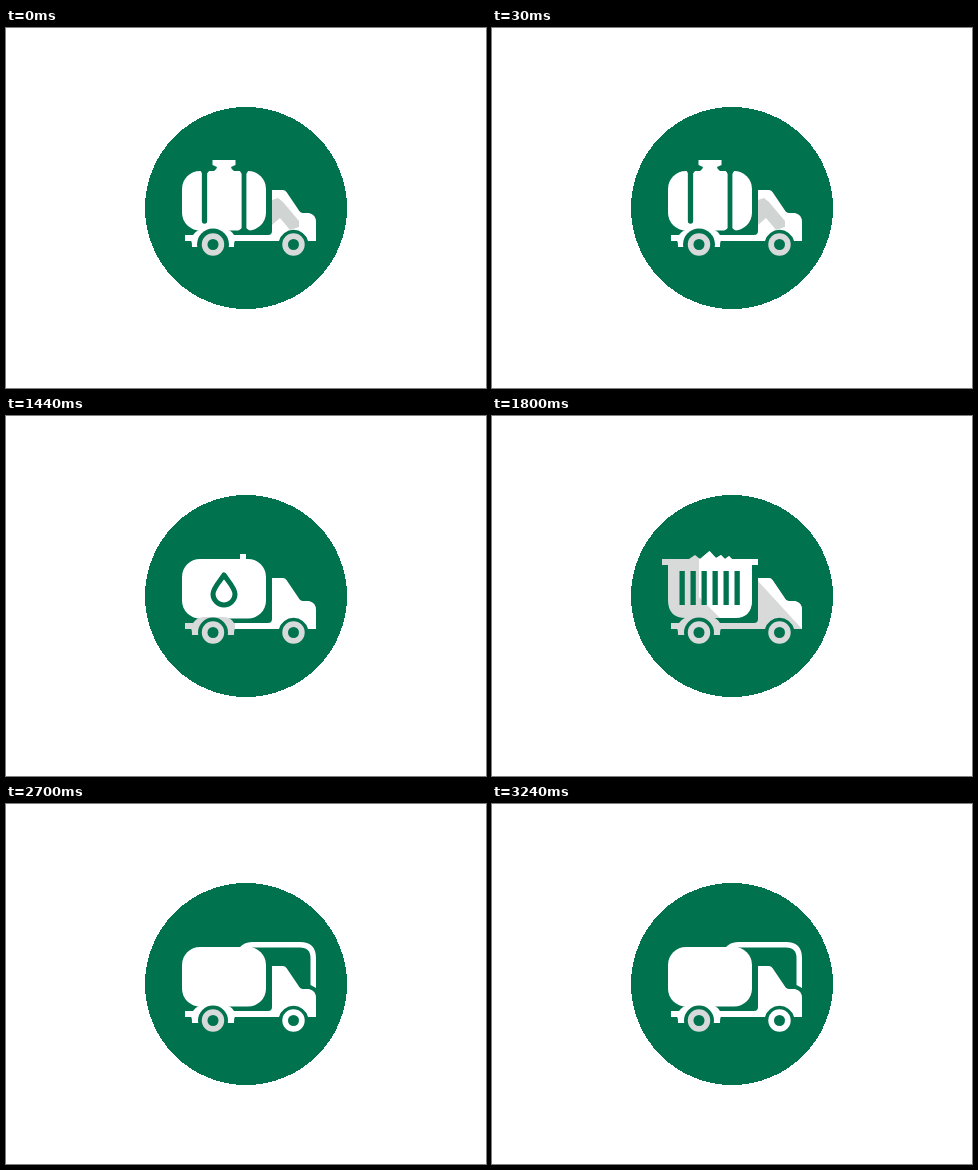
An HTML page without scripts that plays this animation: 480 px wide and 360 px high, repeating every 3.6 s.

```html
<!DOCTYPE html>
<html lang="en">
<head>
<meta charset="utf-8">
<title>Trucks</title>
<style>
  html, body { margin: 0; width: 100%; height: 100%; overflow: hidden; background: #fff; }
  svg { display: block; width: 100%; height: 100%; }
  .white { fill: #fff; }
  .shade { fill: #d7dad9; }
  .green { fill: #00724e; }
  .cut { fill: none; stroke: #00724e; }
  .scene { visibility: hidden; animation: show 3600ms step-end infinite; }
  .two { animation-delay: -2700ms; }
  .three { animation-delay: -1800ms; }
  .four { animation-delay: -900ms; }
  @keyframes show {
    0% { visibility: visible; }
    25%, 100% { visibility: hidden; }
  }
</style>
</head>
<body>
<svg viewBox="0 0 480 360">
  <defs>
    <path id="cab" d="M266 162H277Q279 162 280.500 164L292 181Q294 185 297 185H303Q310 186.500 310 194V213H302A15 15 0 0 0 273 213H228V207H262Q266 207 266 203Z"/>
    <path id="fender" d="M179 207H187Q191 201 198 201H217Q225 201 228 207H229V213Q228 213 228 219H186Q186 213 185 213H179Z"/>
    <rect id="tank" x="176" y="143" width="84" height="59.500" rx="18"/>
    <g id="wheel">
      <circle r="11.200"/>
      <circle r="5.500" class="green"/>
    </g>
    <g id="rearWheel" class="shade">
      <circle cx="207" cy="216.500" r="15" class="green"/>
      <use href="#wheel" x="207" y="216.500"/>
    </g>
    <path id="bin" d="M170 143H197L203 139L208 143L217.500 135L224 142L229 139L233 143L237 140L240 143H266V149H260V184Q260 202 242 202H194Q176 202 176 184V149H170Z"/>
    <clipPath id="binLit"><path d="M207 130V181L229 203H270V130Z"/></clipPath>
    <clipPath id="cabLit"><path d="M266 150V165L311 214V150Z"/></clipPath>
  </defs>

  <circle cx="240" cy="180" r="101" class="green" shape-rendering="crispEdges"/>

  <!-- Banded tank -->
  <g class="scene">
    <g class="white">
      <use href="#tank"/>
      <path d="M206.500 132H229.500V137L225 139Q225 141 228 143H208Q211 141 211 139L206.500 137Z"/>
      <use href="#fender"/>
      <use href="#cab"/>
    </g>
    <path class="cut" stroke-width="5.300" stroke-linecap="round" d="M198.500 145V193"/>
    <path class="cut" stroke-width="4.800" d="M238 143V204"/>
    <path class="green" d="M194 142H204L200.500 146H196.500ZM233 142H243L240 146H236ZM232 203L236 200H240L244 203Z"/>
    <circle cx="207" cy="216.500" r="16" class="green"/>
    <path fill="#d0d5d3" d="M266 172L272 170L277 174L293 193V199L284 202L274 190L266 197Z"/>
    <use href="#rearWheel"/>
    <use href="#wheel" x="287.500" y="216.500" class="shade"/>
  </g>

  <!-- Water tank -->
  <g class="scene two">
    <g class="white">
      <use href="#tank"/>
      <path d="M234 138H240V146H234Z"/>
      <use href="#cab"/>
    </g>
    <path class="cut" stroke-width="5" stroke-linejoin="round" d="M218 159C222 165 229 172 229 178A11 11 0 0 1 207 178C207 172 214 165 218 159Z"/>
    <use href="#fender" class="shade"/>
    <use href="#rearWheel"/>
    <use href="#wheel" x="287.500" y="216.500" class="shade"/>
  </g>

  <!-- Loaded bin -->
  <g class="scene three">
    <g class="shade">
      <use href="#bin"/>
      <use href="#fender"/>
      <use href="#cab"/>
    </g>
    <g class="white">
      <g clip-path="url(#binLit)"><use href="#bin"/></g>
      <g clip-path="url(#cabLit)"><use href="#cab"/></g>
    </g>
    <path class="cut" stroke-width="34" stroke-dasharray="5.300 5.700" d="M187.500 172H249"/>
    <use href="#rearWheel"/>
    <use href="#wheel" x="287.500" y="216.500" class="shade"/>
  </g>

  <!-- Tank with hose -->
  <g class="scene four">
    <g class="white">
      <use href="#tank"/>
      <path d="M233 144Q238 138 246 138H294Q310 138 310 154V184L304.500 181V154Q304.500 143.500 294 143.500H246L254 150Z"/>
      <use href="#fender"/>
      <use href="#cab"/>
    </g>
    <use href="#rearWheel"/>
    <use href="#wheel" x="287.500" y="216.500" class="white"/>
  </g>
</svg>
</body>
</html>
```
